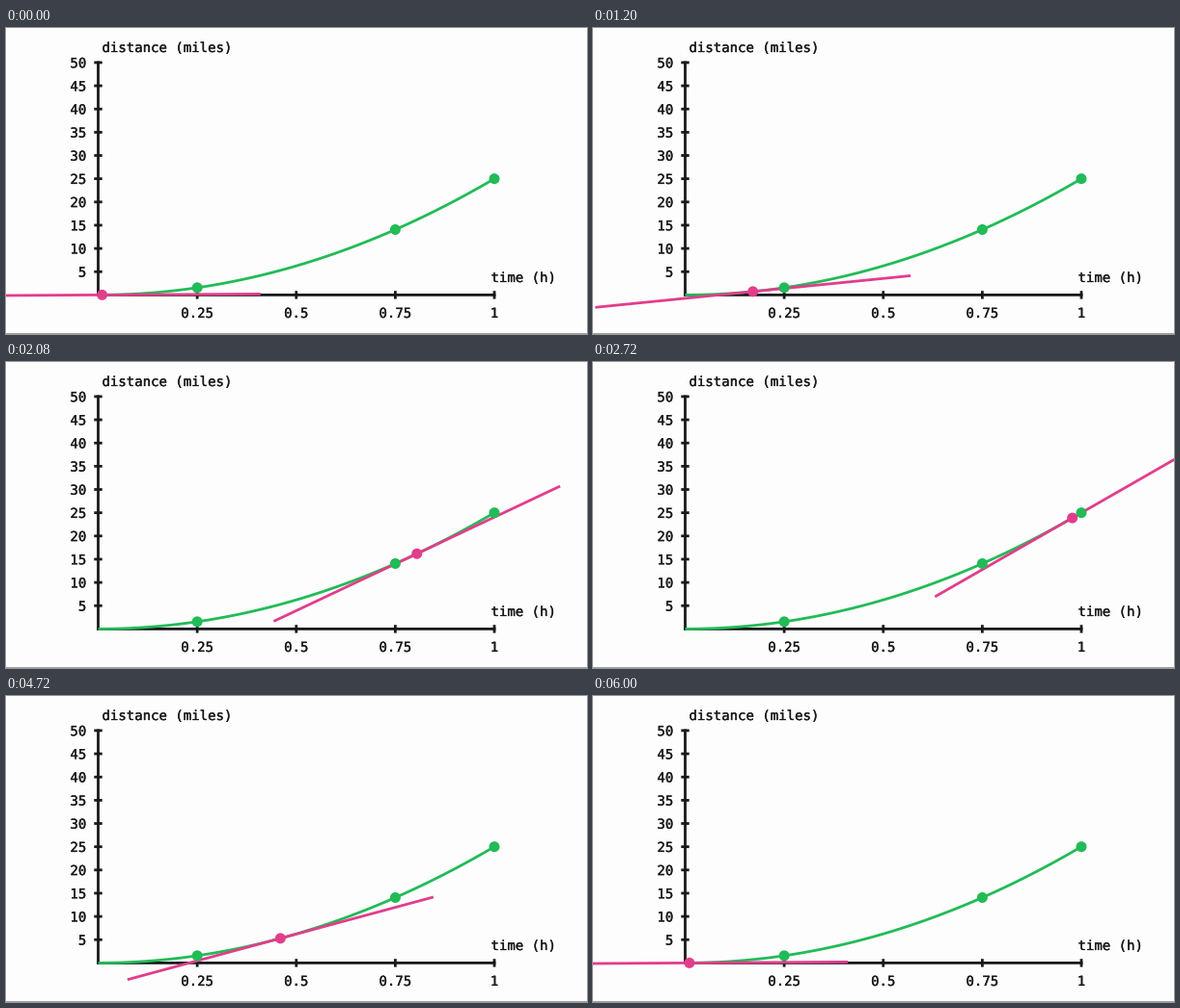
Write a matplotlib script that moves like this. It is 602x318 px and loops after 6.08 s.

```python
import matplotlib.pyplot as plt
import numpy as np
from matplotlib.animation import FuncAnimation
from matplotlib.patches import Circle
from matplotlib.patheffects import withStroke

W, H, DPI = 602, 318, 100
STEP, FRAMES = 80, 76
PX = 72 / DPI  # points per pixel

X0, Y0 = 95.5, 277.4   # chart origin in pixels
SX, SY = 410.5, 4.83   # pixels per hour, pixels per mile
REACH = 0.4 * SX       # half length of the tangent

INK, GREEN, PINK = "#19191c", "#22bb57", "#e23d8c"
LOW, HIGH = 0.01, 0.99
RISE, FALL, LEG = 165, 3178, 3000  # ms

plt.rcParams["font.family"] = "DejaVu Sans Mono"
plt.rcParams["text.hinting"] = "none"
plt.rcParams["toolbar"] = "None"

fig = plt.figure(figsize=(W / DPI, H / DPI), dpi=DPI, facecolor="#fdfdfd")
ax = fig.add_axes([0, 0, 1, 1])
ax.set_xlim(0, W)
ax.set_ylim(H, 0)
ax.axis("off")


def to_px(t):
    return X0 + SX * t, Y0 - SY * 25 * t**2


def line(xs, ys, color, z, width=2.8):
    return ax.plot(xs, ys, color=color, lw=width * PX, zorder=z,
                   solid_capstyle="butt", snap=False)[0]


def dot(x, y, color, z):
    return ax.add_patch(Circle((x, y), 5.5, fc=color, lw=0, zorder=z,
                               snap=False))


def label(x, y, text, align="left"):
    ax.text(x, y, text, color=INK, size=14 * PX, ha=align, va="baseline",
            path_effects=[withStroke(linewidth=0.3 * PX, foreground=INK)])


def ease(u):
    u = np.clip(u, 0, 1)
    return 4 * u**3 if u < 0.5 else 1 - 4 * (1 - u)**3


def hour_at(ms):
    k = ease((ms - RISE) / LEG) - ease((ms - FALL) / LEG)
    return LOW + (HIGH - LOW) * k


# axes, ticks and labels
line([X0, X0], [Y0 - 50 * SY - 1.4, Y0 + 1.4], INK, 1)
line([X0 - 1.4, X0 + SX + 1.4], [Y0, Y0], INK, 1)
for miles in range(5, 51, 5):
    y = Y0 - miles * SY
    line([X0 - 4.2, X0 + 4.2], [y, y], INK, 1)
    label(83.3, y + 5.3, str(miles), "right")
for hour in (0.25, 0.5, 0.75, 1):
    x = X0 + hour * SX
    line([x, x], [Y0 - 4.2, Y0 + 4.2], INK, 1)
    label(x, 301, f"{hour:g}", "center")
label(99.5, 25, "distance (miles)")
label(502.5, 264, "time (h)")
line([0, W], [317.5, 317.5], "#a0a0a0", 1, 1)

# distance curve with its marked points
line(*to_px(np.linspace(0, 1, 120)), GREEN, 2)
for hour in (0.25, 0.75, 1):
    dot(*to_px(hour), GREEN, 4)

tangent = line([], [], PINK, 3)
marker = dot(0, 0, PINK, 5)


def draw(i):
    t = hour_at(i * STEP)
    x, y = to_px(t)
    slope = -50 * t * SY / SX
    dx = REACH / np.hypot(1, slope)
    tangent.set_data([x - dx, x + dx], [y - slope * dx, y + slope * dx])
    marker.center = x, y
    return tangent, marker


anim = FuncAnimation(fig, draw, frames=FRAMES, interval=STEP, repeat=True,
                     repeat_delay=0, init_func=lambda: draw(0))
plt.show()
```
